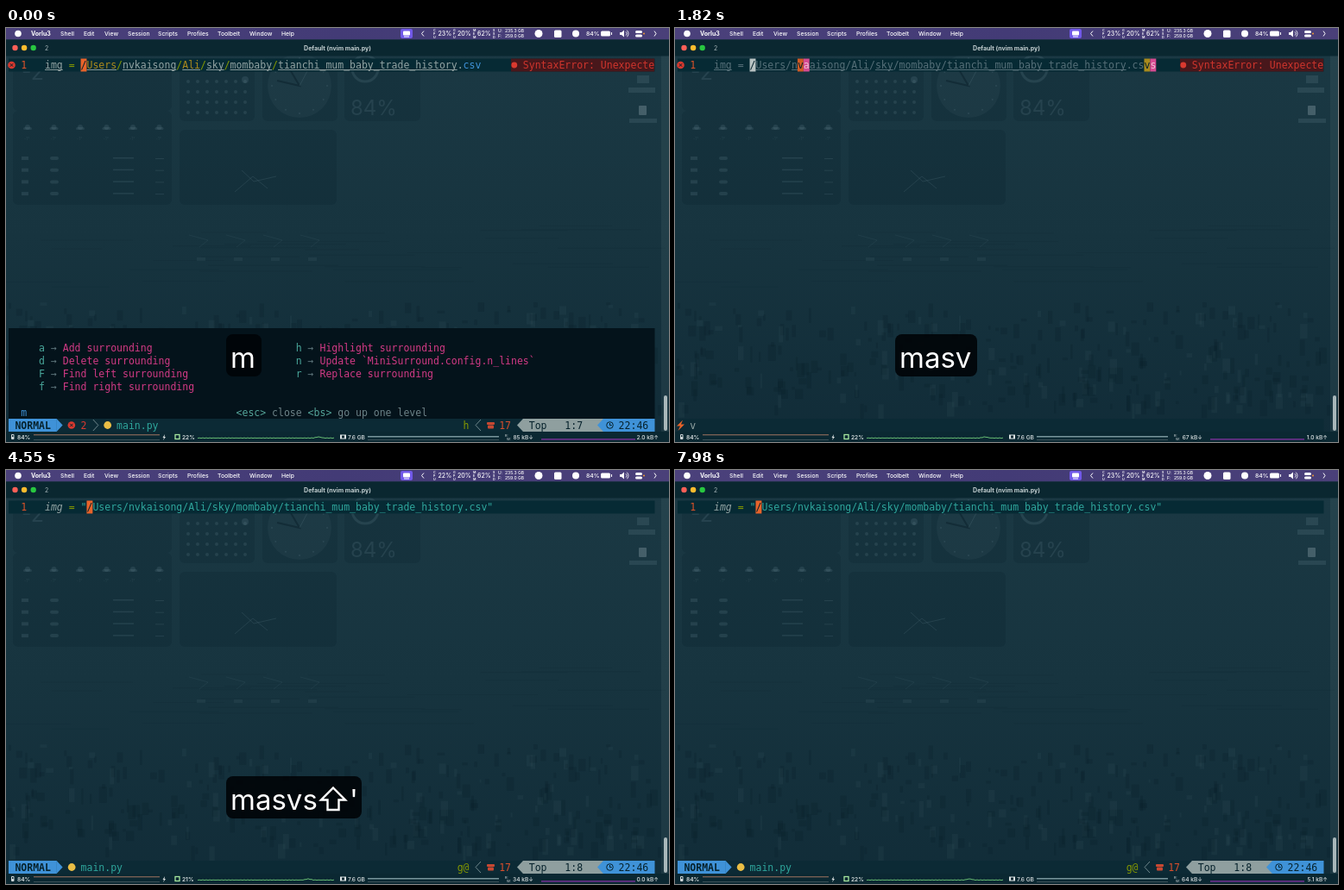
Recreate the animation shown at these times as an HTML page with a canvas. Size 768 by 480 pixels, loop 8 s.

```html
<!DOCTYPE html>
<html lang="en">
<head>
<meta charset="utf-8">
<title>Surround with motion</title>
<style>
html, body { margin: 0; width: 100%; height: 100%; overflow: hidden; background: #17333f; }
canvas { display: block; width: 768px; height: 480px; }
</style>
</head>
<body>
<canvas id="stage" width="768" height="480"></canvas>
<script>
const LOOP = 8000, CELL = 6.923, LEFT = 3.46;
const MONO = '"DejaVu Sans Mono", monospace', SANS = 'Inter, sans-serif';
const C = {
  text: '#93a3a3', dim: '#566f78', red: '#d9392f', orange: '#e8632a', green: '#859900',
  yellow: '#ad8a1c', teal: '#2fa69c', blue: '#3f92d8', pink: '#d23a86', ink: '#06222c', row: '#062a34'
};
// Key presses and what they lead to, in ms.
const AT = { a: 210, flash: 980, search: 1750, jump: 2590, quoted: 3080, clean: 3920, fade: 5390 };
// time, menu bar CPU, status bar CPU, download, upload
const STATS = [
  [0, 23, 22, 85, '2.0'], [1100, 23, 22, 67, '1.0'], [3000, 22, 21, 34, '0.0'],
  [5000, 24, 23, 73, '7.2'], [6100, 24, 22, 74, '2.0'], [7100, 23, 22, 64, '5.1']
];

const stage = document.getElementById('stage').getContext('2d');
let ctx = stage;
const col = n => LEFT + n * CELL;

function rect(x, y, w, h, color, radius = 0) {
  ctx.fillStyle = color;
  ctx.beginPath();
  ctx.roundRect(x, y, w, h, radius);
  ctx.fill();
}
function circle(x, y, r, color) {
  ctx.fillStyle = color;
  ctx.beginPath();
  ctx.arc(x, y, r, 0, 7);
  ctx.fill();
}
function ring(x, y, r, color, width = 1, from = 0, to = 2 * Math.PI) {
  ctx.strokeStyle = color;
  ctx.lineWidth = width;
  ctx.beginPath();
  ctx.arc(x, y, r, from, to);
  ctx.stroke();
}
function line(points, color, width = 1) {
  ctx.strokeStyle = color;
  ctx.lineWidth = width;
  ctx.beginPath();
  points.forEach(([x, y]) => ctx.lineTo(x, y));
  ctx.stroke();
}
function shape(points, color) {
  ctx.fillStyle = color;
  ctx.beginPath();
  points.forEach(([x, y]) => ctx.lineTo(x, y));
  ctx.fill();
}
function label(str, x, y, size, color = '#e9ecee', weight = 400, align = 'left') {
  ctx.font = `${weight} ${size}px ${SANS}`;
  ctx.textAlign = align;
  ctx.fillStyle = color;
  ctx.fillText(str, x, y);
  ctx.textAlign = 'left';
}
// Terminal text; y is the middle of the row.
function term(str, n, y, color, style = '') {
  ctx.font = `${style} 11.5px ${MONO}`;
  ctx.fillStyle = color;
  ctx.fillText(str, col(n), y + 4);
}
// Consecutive [text, color] runs.
function runs(list, n, y) {
  for (const [str, color] of list) {
    term(str, n, y, color);
    n += str.length;
  }
}
function errorIcon(x, y) {
  circle(x, y, 4.3, C.red);
  line([[x - 1.7, y - 1.7], [x + 1.7, y + 1.7]], C.ink);
  line([[x - 1.7, y + 1.7], [x + 1.7, y - 1.7]], C.ink);
}

function drawWallpaper() {
  const sky = ctx.createLinearGradient(0, 0, 0, 480);
  sky.addColorStop(0, '#1b3944');
  sky.addColorStop(.5, '#17343f');
  sky.addColorStop(1, '#112c38');
  rect(0, 0, 768, 480, sky);

  let seed = 7;
  const rnd = () => (seed = seed * 16807 % 2147483647) / 2147483647;
  for (let i = 0; i < 30; i++)
    rect(rnd() * 680, 225 + rnd() * 75, 40 + rnd() * 120, 1, 'rgba(8,30,42,.12)');
  for (let i = 0; i < 330; i++) {
    const x = rnd() * 755, y = 318 + rnd() * 120;
    const shade = rnd() < .75 ? 'rgba(5,25,36,.2)' : 'rgba(70,100,105,.12)';
    rect(x, y, 2 + rnd() * 7, 3 + rnd() * 16, shade);
  }

  const panel = 'rgba(5,28,38,.17)', faint = 'rgba(125,155,165,.16)';
  rect(8, 35, 184, 61, panel, 6);
  rect(8, 96, 184, 109, panel, 6);
  rect(201, 35, 87, 73, panel, 6);
  rect(297, 35, 87, 73, panel, 6);
  rect(392, 35, 88, 73, panel, 6);
  rect(201, 118, 182, 87, panel, 6);
  label('-2°', 18, 60, 25, faint);
  for (let i = 0; i < 6; i++) {
    const x = 25 + i * 30.5;
    circle(x, 115, 3, faint);
    rect(x - 5, 115, 10, 3, faint, 1.5);
    label('-1°', x - 4, 130, 5, faint);
  }
  for (let i = 0; i < 4; i++) {
    const y = 151 + i * 13.7;
    rect(18, y - 2, 8, 4, faint);
    rect(51, y - 2, 10, 4, faint, 2);
    rect(124, y - 1, 24, 1.5, faint);
    rect(173, y, 10, 1, faint);
  }
  for (let i = 0; i < 28; i++) rect(209 + i % 7 * 11, 60 + (i / 7 | 0) * 12, 4, 4, faint, 2);
  circle(277, 60, 4, faint);

  circle(340, 67, 37, 'rgba(110,145,155,.08)');
  for (let i = 0; i < 12; i++) {
    const a = i * Math.PI / 6;
    circle(340 + 32 * Math.cos(a), 67 + 32 * Math.sin(a), 1, faint);
  }
  line([[330, 50], [340, 67], [314, 61]], 'rgba(5,25,35,.4)', 2);
  line([[349, 50], [340, 67]], faint);
  ring(416, 47, 15, faint, 3);
  label('84%', 399, 101, 24, faint);
  line([[265, 190], [286, 172], [303, 186]], faint);
  line([[273, 165], [287, 178], [313, 172]], faint);
  for (let i = 0; i < 4; i++) {
    const x = 226 + i * 43;
    line([[x - 14, 240], [x + 8, 246], [x - 2, 254]], 'rgba(125,155,165,.09)');
    rect(x - 5, 266, 10, 4, 'rgba(125,155,165,.09)');
  }
  rect(731, 55, 14, 9, faint);
  rect(721, 69, 31, 6, faint);
  rect(733, 90, 9, 11, 'rgba(170,190,195,.3)', 1);
  rect(722, 105, 32, 5, faint);
}

function drawChrome() {
  const bar = ctx.createLinearGradient(0, 0, 768, 0);
  bar.addColorStop(0, '#4b417b');
  bar.addColorStop(.5, '#433b76');
  bar.addColorStop(1, '#4a4079');
  rect(0, 0, 768, 13.5, bar);
  circle(14, 6.5, 3.8, '#fff');
  label('Vorlu3', 29, 9, 7, '#fff', 700);
  [['Shell', 63], ['Edit', 90], ['View', 114], ['Session', 141], ['Scripts', 176], ['Profiles', 210],
   ['Toolbelt', 245], ['Window', 282], ['Help', 319]].forEach(([s, x]) => label(s, x, 9, 6.8, '#fff', 500));

  rect(457, 1, 14, 11, '#7159e8', 2);
  rect(460, 3.5, 8, 5, '#fff', 1);
  rect(461, 9.5, 6, 1, '#fff');
  line([[484, 3.5], [481.5, 6.5], [484, 9.5]], '#fff');
  [['CPU', 495], ['GPU', 518], ['MEM', 541], ['SSD', 564]].forEach(([word, x]) =>
    [...word].forEach((ch, i) => label(ch, x, 4.3 + i * 3.8, 3.7, '#fff', 600)));
  label('20%', 523, 9, 7, '#fff', 500);
  label('62%', 546, 9, 7, '#fff', 500);
  [['U:', '235.3 GB', 5.4], ['F:', '259.0 GB', 11.3]].forEach(([k, v, y]) => {
    label(k, 570, y, 5, '#fff', 500);
    label(v, 578, y, 5, '#fff', 500);
  });
  circle(617, 6.5, 4.5, '#fff');
  rect(635, 2.5, 8.5, 8.5, '#fff', 1.5);
  circle(660, 6.5, 4, '#fff');
  label('84%', 672, 9, 6.8, '#fff', 500);
  rect(689, 3.5, 11, 6, '#fff', 1.5);
  rect(701, 5, 1, 3, '#fff');
  shape([[711, 5], [713, 5], [716, 2.5], [716, 10.5], [713, 8], [711, 8]], '#fff');
  ring(716, 6.5, 3, '#fff', .8, -.9, .9);
  ring(716, 6.5, 5, '#fff', .8, -.9, .9);
  rect(729, 3, 8, 3, '#fff', 1.5);
  rect(729, 7.5, 8, 3, '#fff', 1.5);
  circle(739, 6.5, 1, '#f39b35');
  line([[751, 3.5], [753, 6.5], [751, 9.5]], '#fff');

  rect(0, 13.5, 768, 19, '#0a2730');
  ['#ff5f57', '#febc2e', '#28c840'].forEach((c, i) => circle(10.5 + i * 10.6, 23, 3.2, c));
  label('2', 45, 25.7, 7, '#aab8bb');
  label('Default (nvim main.py)', 384, 25.7, 7, '#c5d0d2', 700, 'center');
  rect(759, 32.5, 9, 436, 'rgba(130,155,160,.1)');
  rect(762, 426, 4, 41, '#a9b7ba', 2);

  rect(0, 468, 768, 12, '#0b2832');
  rect(6, 471, 3.5, 6, '#cfd6d8', 1);
  rect(7, 472, 1.5, 2, '#0b2832');
  label('84%', 13, 476.6, 6.6, '#dce2e3', 600);
  rect(32, 471.3, 146, 1, '#a0745f');
  rect(32, 477, 146, 1, '#3c5158');
  shape([[184, 471], [181.5, 475], [183, 475], [182, 478], [185, 474], [183.5, 474]], '#dce2e3');
  ctx.strokeStyle = '#a7e89f';
  ctx.lineWidth = 1.3;
  ctx.strokeRect(196, 471.5, 5, 5);
  rect(387, 471.5, 7, 5, '#dce2e3');
  rect(389, 472.5, 3, 3, '#0b2832');
  label('7.6 GB', 396, 476.6, 6.6, '#dce2e3', 500);
  rect(419, 473, 152, 1.4, '#78959c');
  rect(419, 477, 152, 1, '#3c5158');
  label('R:', 578, 474, 4, '#dce2e3');
  label('W:', 580, 478, 4, '#dce2e3');
  rect(620, 476.3, 109, 1.2, '#8733a6');
}

function drawStats(t) {
  const [, cpu, load, down, up] = STATS.findLast(s => s[0] <= t);
  label(cpu + '%', 500.5, 9, 7, '#fff', 500);
  label(load + '%', 204, 476.6, 6.6, '#dce2e3', 600);
  label(down + ' kB↓', 611, 476.6, 6.6, '#dce2e3', 500, 'right');
  label(up + ' kB↑', 756, 476.6, 6.6, '#dce2e3', 500, 'right');
  const peak = 362 - Math.floor(t / 1000) * 3, graph = [];
  for (let x = 222; x <= 380; x += 2)
    graph.push([x, 475.4 + .3 * Math.sin(x * 1.7) - 1.3 * Math.exp(-(((x - peak) / 4) ** 2))]);
  line(graph, '#67bd74');
}

function drawCode(t) {
  const y = 43, flashing = t >= AT.flash && t < AT.jump, quoted = t >= AT.quoted;
  rect(3, 35.5, 748.5, 15, C.row);
  if (t < AT.clean) {
    errorIcon(6.5, y);
    const n = quoted ? 86 : 84;
    rect(col(n), 35.5, col(108) - col(n), 15, '#48171b');
    circle(col(n) + 3.8, y, 3.4, C.red);
    term(quoted ? 'Pyright: Expected ex' : 'SyntaxError: Unexpecte', n + 2, y, '#cf352d');
  }
  term('1', 2, y, '#dc522a');

  const path = '/Users/nvkaisong/Ali/sky/mombaby/tianchi_mum_baby_trade_history';
  if (quoted) {
    term('img', 6, y, C.text, 'italic');
    term('=', 10, y, C.green);
    term(`"${path}.csv"`, 12, y, C.teal);
    rect(col(13), 35.5, CELL, 15, C.orange);
    term('/', 13, y, C.ink);
    return;
  }

  const tint = c => flashing ? C.dim : c;
  const underline = (n, len) => rect(col(n), 48, len * CELL, 1, tint('#8b9a9b'));
  runs([['img', tint(C.text)], [' = ', tint(C.green)]], 6, y);
  underline(6, 3);
  let n = 12;
  for (const word of path.slice(1).split('/')) {
    runs([['/', tint(C.green)], [word, tint(/^[A-Z]/.test(word) ? C.yellow : C.text)]], n, y);
    underline(n + 1, word.length);
    n += word.length + 1;
  }
  runs([['.', tint(C.text)], ['csv', tint(C.blue)]], n, y);

  if (flashing || t < AT.a) {
    rect(col(12), 35.5, CELL, 15, flashing ? '#b9c3c3' : C.orange);
    term('/', 12, y, C.ink);
  } else rect(col(12), 48, CELL, 2, C.orange);

  if (t >= AT.search && t < AT.jump)
    [[20, '#cf5a25', 'a'], [78, '#a98b1d', 's']].forEach(([at, color, key]) => {
      rect(col(at), 35.5, CELL, 15, color);
      term('v', at, y, C.ink);
      rect(col(at + 1), 35.5, CELL, 15, '#d64a91');
      term(key, at + 1, y, '#efc3d8');
    });
}

function drawStatus(t) {
  const y = 460.5, top = 453, h = 15;
  rect(3, top, 748.5, h, '#0c2a35');
  if (t >= AT.flash && t < AT.jump) {
    shape([[9, 454.5], [2, 461.5], [6, 461.5], [3.5, 467], [11, 459.5], [7, 459.5]], C.orange);
    if (t >= AT.search) term('v', 2, y, C.text);
    return;
  }
  const arrow = (x, dir, color) => shape([[x, top], [x + 7 * dir, top + h / 2], [x, top + h]], color);
  const mode = t < AT.a || t >= AT.quoted ? 'NORMAL' : 'O-PENDING';
  let n = mode.length + 2;
  rect(3, top, col(n) - 3, h, C.blue);
  arrow(col(n) - .2, 1, C.blue);
  term(mode, 1, y, C.ink, 'bold');
  if (t < AT.clean) {
    errorIcon(col(n) + 17, y);
    term('2', n + 4, y, C.red);
    const x = col(n) + 42;
    line([[x, top + 1], [x + 6, y], [x, top + h - 1]], '#70878c');
    n += 6;
  }
  circle(col(n) + 17.3, y, 4.4, '#e9bd45');
  term('main.py', n + 4, y, C.teal);

  if (t < AT.a) term('h', 76, y, C.green);
  else term('g@', 75, y, C.green);
  line([[550, top + 1], [544, y], [550, top + h - 1]], '#70878c');
  rect(557, 457, 9, 3, '#c74832', 1);
  rect(558, 460.5, 7, 4, '#c74832', 1);
  term('17', 82, y, '#d64e2c');
  arrow(599, -1, '#8f9f9f');
  rect(598.9, top, 94, h, '#8f9f9f');
  term('Top', 87, y, C.ink);
  term(t >= AT.quoted ? '1:8' : '1:7', 93, y, C.ink);
  arrow(692, -1, C.blue);
  rect(691.9, top, 59.6, h, C.blue);
  ring(699.5, y, 3.8, C.ink);
  line([[699.5, 458], [699.5, 460.7], [701.8, 460.7]], C.ink);
  term('22:46', 102, y, C.ink);
}

function drawKeyHints() {
  rect(3, 348, 748.5, 105, '#04131b');
  const hints = [
    [5, ['a', 'Add surrounding'], ['d', 'Delete surrounding'], ['F', 'Find left surrounding'], ['f', 'Find right surrounding']],
    [48, ['h', 'Highlight surrounding'], ['n', 'Update `MiniSurround.config.n_lines`'], ['r', 'Replace surrounding']]
  ];
  for (const [n, ...rows] of hints)
    rows.forEach(([key, text], i) =>
      runs([[key, '#49a79b'], [' → ', '#60777d'], [text, C.pink]], n, 371 + i * 14.95));
  term('m', 2, 446, C.blue);
  runs([['<esc>', '#55a59a'], [' close ', '#6d8287'], ['<bs>', '#55a59a'], [' go up one level', '#6d8287']], 38, 446);
}

function drawKeycast(t) {
  const alpha = 1 - Math.max(0, t - AT.fade) / 560;
  if (alpha <= 0) return;
  const count = 1 + [AT.a, AT.flash, AT.search, AT.jump].filter(at => t >= at).length;
  const quote = t >= AT.quoted;
  const width = quote ? 157 : [41, 60, 77, 95, 111][count - 1];
  ctx.globalAlpha = alpha;
  rect(255, 355, width, 49, 'rgba(0,4,7,.9)', 8);
  label('masvs'.slice(0, count), 260, 393.5, 33, '#fff');
  if (quote) {
    line([[379, 368.5], [393, 382.5], [385.5, 382.5], [385.5, 394], [372.5, 394], [372.5, 382.5],
          [365, 382.5], [379, 368.5], [380, 369.5]], '#fff', 2.4);
    label("'", 398, 393.5, 33, '#fff');
  }
  ctx.globalAlpha = 1;
}

const backdrop = document.createElement('canvas');
backdrop.width = 768;
backdrop.height = 480;
ctx = backdrop.getContext('2d');
drawWallpaper();
drawChrome();
ctx = stage;

function frame(now) {
  const t = now % LOOP;
  ctx.drawImage(backdrop, 0, 0);
  drawStats(t);
  drawCode(t);
  drawStatus(t);
  if (t < AT.a) drawKeyHints();
  drawKeycast(t);
  requestAnimationFrame(frame);
}
requestAnimationFrame(frame);
</script>
</body>
</html>
```
